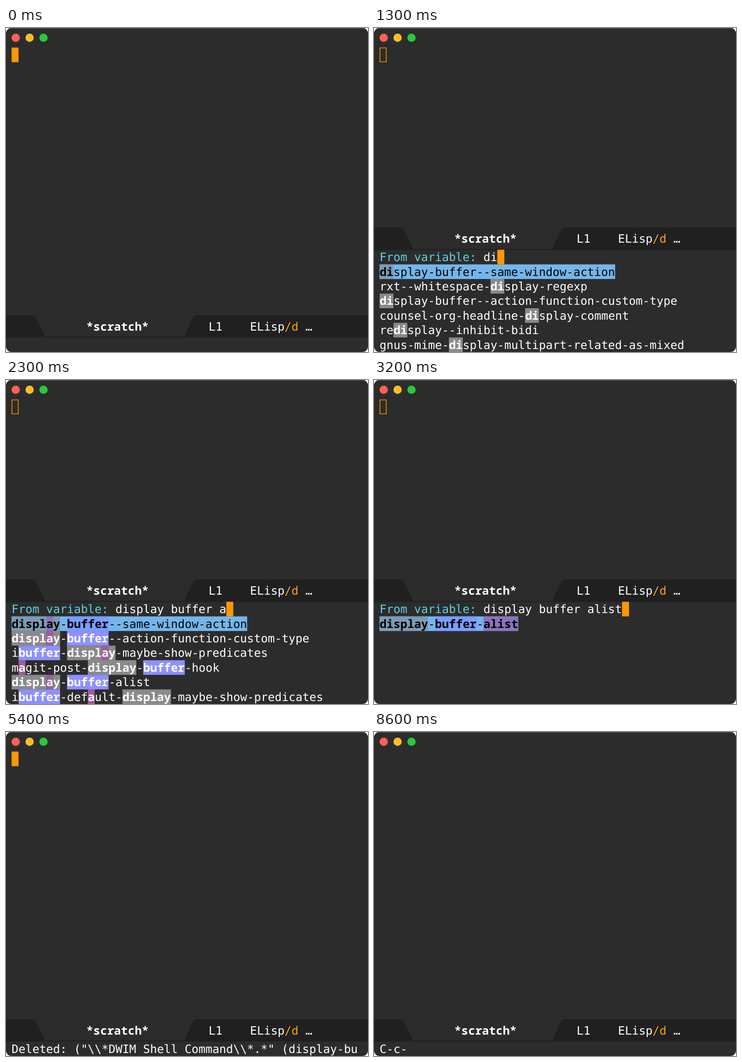
Animation of 730x652 px, one loop 8.8 s. Source, as an HTML page:

```html
<!DOCTYPE html>
<html lang="en">
<head>
<meta charset="utf-8">
<title>Remove from list variable</title>
<style>
  html, body { margin: 0; width: 100%; height: 100%; overflow: hidden; background: #fff; }
  svg { display: block; width: 730px; height: 652px; }
  text {
    font: 23.2px "DejaVu Sans Mono", "Noto Sans Mono", monospace;
    fill: #fff; white-space: pre; text-rendering: geometricPrecision;
    font-variant-ligatures: none;
  }
  .bold { font: 700 23.28px "Noto Sans Mono", "DejaVu Sans Mono", monospace; }
  .prompt { fill: #5fd3e0; }
  .accent { fill: #ffa31a; }
  .dark { fill: #000; }
</style>
</head>
<body>
<svg viewBox="0 0 730 652">
  <defs><clipPath id="frame"><rect width="730" height="652" rx="11"/></clipPath></defs>
  <g clip-path="url(#frame)">
    <rect width="730" height="652" fill="#2c2c2c"/>
    <rect width="730" height="1" fill="#5c5c5c"/>
    <circle cx="19.6" cy="19.6" r="8.4" fill="#ff5f57"/>
    <circle cx="47.6" cy="19.6" r="8.4" fill="#febc2e"/>
    <circle cx="75.6" cy="19.6" r="8.4" fill="#28c840"/>
    <rect id="point" stroke="#ff9800"/>
    <g id="modeline">
      <rect y="578" width="730" height="45" fill="#202020"/>
      <path d="M58 578H380L359 621H79Z" fill="#2c2c2c"/>
      <text class="bold" x="162" y="608.6">*scratch*</text>
      <text x="408.5" y="608.6">L1</text>
      <text x="492" y="608.6">ELisp<tspan class="accent">/d</tspan> …</text>
    </g>
    <g id="mini"></g>
  </g>
</svg>
<script>
const LOOP = 8800, LEFT = 11.3, CHAR = 13.97, ROW = 29.4, LAST_ROW = 622.7, COLS = 50;
const ORANGE = '#ff9800', SELECTED = '#75b5ec';
const MATCH = ['#8a8a8a', '#8e90ff', '#9b5f9b'];
const MATCH_SELECTED = ['#7c9bb3', '#7b9dff', '#8e72bd'];

const commands = `remove-from-list-variable
counsel-describe-variable
dwim-shell-command-resize-image-file
org-agenda-list
magit-status
toggle-frame-fullscreen`.split('\n');

const variables = `org-super-agenda-date-format
org-element-paragraph-separate
dumb-jump-project
hydra-message-timer
dumb-jump-language-contexts
table-source-caption-history
display-buffer--same-window-action
rxt--whitespace-display-regexp
display-buffer--action-function-custom-type
counsel-org-headline-display-comment
redisplay--inhibit-bidi
gnus-mime-display-multipart-related-as-mixed
ibuffer-display-maybe-show-predicates
magit-post-display-buffer-hook
display-buffer-alist
ibuffer-default-display-maybe-show-predicates
display-buffer-fallback-action`.split('\n');

const entry = String.raw`("\\*DWIM Shell Command\\*.*" (display-buffer-same-window))`;
const entries = [entry, String.raw`("\\*compilation\\*" (display-buffer-no-window))`];

const typed = (at, input) => ({ at, prompt: 'From variable: ', input, list: variables, rows: 7 });
const echo = (at, message) => ({ at, message, rows: 1 });

const steps = [
  echo(0, ''),
  { at: 300, prompt: 'M-x ', input: '', list: [], rows: 1 },
  { at: 400, prompt: 'M-x ', input: '', list: commands, rows: 7 },
  typed(800, ''),
  typed(1200, 'd'),
  typed(1300, 'di'),
  typed(1400, 'disp'),
  typed(1500, 'displa'),
  typed(1600, 'display '),
  typed(1800, 'display b'),
  typed(1900, 'display buf'),
  typed(2000, 'display buff'),
  typed(2200, 'display buffer '),
  typed(2300, 'display buffer a'),
  typed(2400, 'display buffer al'),
  typed(2600, 'display buffer alist'),
  { at: 3400, prompt: 'Delete: ', input: '', list: entries, rows: 3 },
  echo(5400, 'Deleted: ' + entry),
  echo(8600, 'C-c-'),
];

// Times at which the cursor turns off, then on again.
const blinks = [2900, 3200, 3800, 4100, 4400, 4800, 5100, 5400, 5800, 6100,
  6400, 6800, 7100, 7400, 7800, 8100, 8400];

const [point, modeline, mini] = ['point', 'modeline', 'mini'].map(id => document.getElementById(id));

const text = (col, top, string, cls = '') =>
  `<text class="${cls}" x="${LEFT + col * CHAR}" y="${top + 22.8}">${string}</text>`;
const box = (col, top, count, fill) =>
  `<rect x="${LEFT + col * CHAR}" y="${top}" width="${count * CHAR}" height="${ROW}" fill="${fill}"/>`;

function candidate(name, tokens, top, selected) {
  const line = name.slice(0, COLS);
  const marks = Array(line.length).fill(-1);
  tokens.forEach((token, i) => {
    const start = line.indexOf(token);
    marks.fill(i, start, start + token.length);
  });
  const colors = selected ? MATCH_SELECTED : MATCH;
  let back = selected ? box(0, top, line.length, SELECTED) : '', front = '';
  for (let from = 0, to; from < line.length; from = to) {
    const mark = marks[from];
    for (to = from + 1; to < line.length && marks[to] === mark;) to++;
    if (mark >= 0) back += box(from, top, to - from, colors[mark]);
    front += text(from, top, line.slice(from, to),
      (mark >= 0 ? 'bold ' : '') + (selected ? 'dark' : ''));
  }
  return back + front;
}

function minibuffer({ prompt, input, list, rows, message }, cursorOn) {
  if (!prompt) return text(0, LAST_ROW, message.slice(0, COLS));
  const top = LAST_ROW - (rows - 1) * ROW;
  const tokens = input.split(' ').filter(Boolean);
  const found = list.filter(name => tokens.every(t => name.includes(t))).slice(0, 6);
  const end = prompt.length + input.length;
  return text(0, top, prompt, 'prompt') + text(prompt.length, top, input) +
    found.map((name, i) => candidate(name, tokens, top + (i + 1) * ROW, i === 0)).join('') +
    (cursorOn ? box(end, top, 1, ORANGE) : '');
}

function place(hollow, visible) {
  const line = hollow ? 1.4 : 0;
  const look = {
    x: LEFT + line / 2, y: 39.4 + line / 2, width: CHAR - line, height: ROW - line,
    fill: hollow ? 'none' : ORANGE, 'stroke-width': line,
    visibility: visible ? 'visible' : 'hidden',
  };
  for (const key in look) point.setAttribute(key, look[key]);
}

let shown = '';
function draw() {
  const time = performance.now() % LOOP;
  const step = steps.findLast(s => s.at <= time);
  const cursorOn = blinks.filter(t => t <= time).length % 2 === 0;
  const key = step.at + '/' + cursorOn;
  if (key !== shown) {
    shown = key;
    const active = Boolean(step.prompt);
    place(active, active || cursorOn);
    modeline.setAttribute('transform', `translate(0 ${-(step.rows - 1) * ROW})`);
    mini.innerHTML = minibuffer(step, cursorOn);
  }
  requestAnimationFrame(draw);
}
draw();
</script>
</body>
</html>
```
